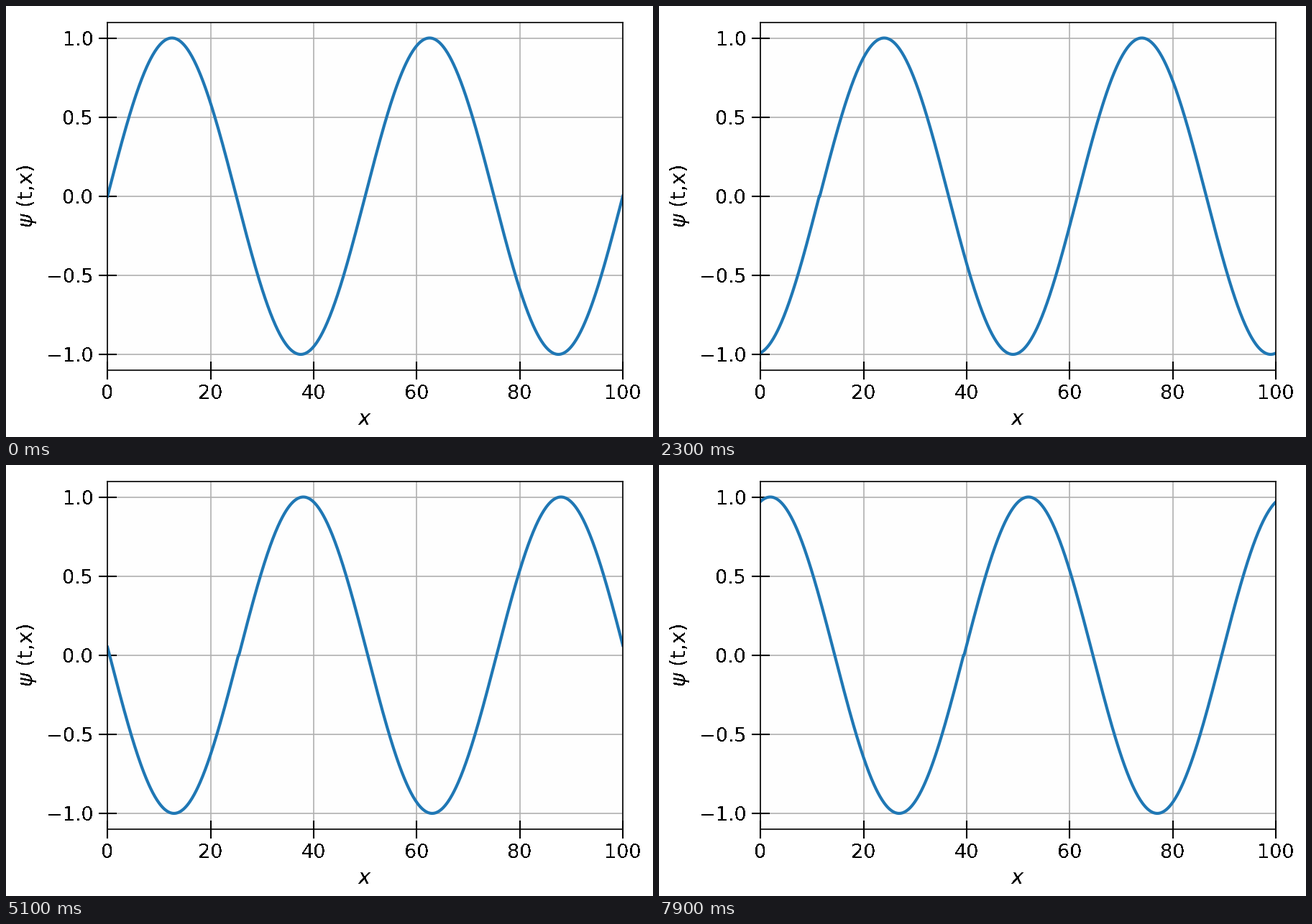
These frames come from a looping animation (900x600 px, 8 s). A matplotlib script:

```python
import numpy as np
import matplotlib.pyplot as plt
from matplotlib.animation import FuncAnimation

W, H, DPI = 900, 600, 150
FRAMES, INTERVAL = 80, 100
WAVELENGTH = 50
CELLS_PER_FRAME = 5

plt.rcParams.update({
    "font.family": "DejaVu Sans",
    "mathtext.fontset": "dejavusans",
    "text.antialiased": False,
})

fig = plt.figure(figsize=(W / DPI, H / DPI), dpi=DPI, facecolor="white")

left, right, top, bottom = 141.2, 858.0, 22.5, 507.0
ax = fig.add_axes([left / W, 1 - bottom / H, (right - left) / W, (bottom - top) / H],
                  facecolor="#fefefe")
ax.set(xlim=(0, 100), ylim=(-1.1, 1.1),
       xticks=range(0, 101, 20), yticks=np.arange(-1, 1.1, 0.5))
ax.tick_params(direction="inout", length=12, width=1, labelsize=13)
ax.grid(True, color="#b0b0b0", linewidth=0.8)


def axis_label(px, py, text, rotation=0):
    fig.text(px / W, 1 - py / H, text, fontsize=14, ha="center", va="baseline",
             rotation=rotation, rotation_mode="anchor")


axis_label((left + right) / 2, 583, r"$x$")
axis_label(37, (top + bottom) / 2, r"$\psi$ (t,x)", rotation=90)

# Periodic grid advected by whole cells
x = np.linspace(0, 100, 1001)
psi0 = np.sin(2 * np.pi * x / WAVELENGTH)
line, = ax.plot(x, psi0, color="#1f77b4", linewidth=2)


def update(i):
    line.set_ydata(np.roll(psi0, i * CELLS_PER_FRAME))
    return line,


anim = FuncAnimation(fig, update, frames=FRAMES, interval=INTERVAL,
                     repeat=True, repeat_delay=0, blit=False)
plt.show()
```
